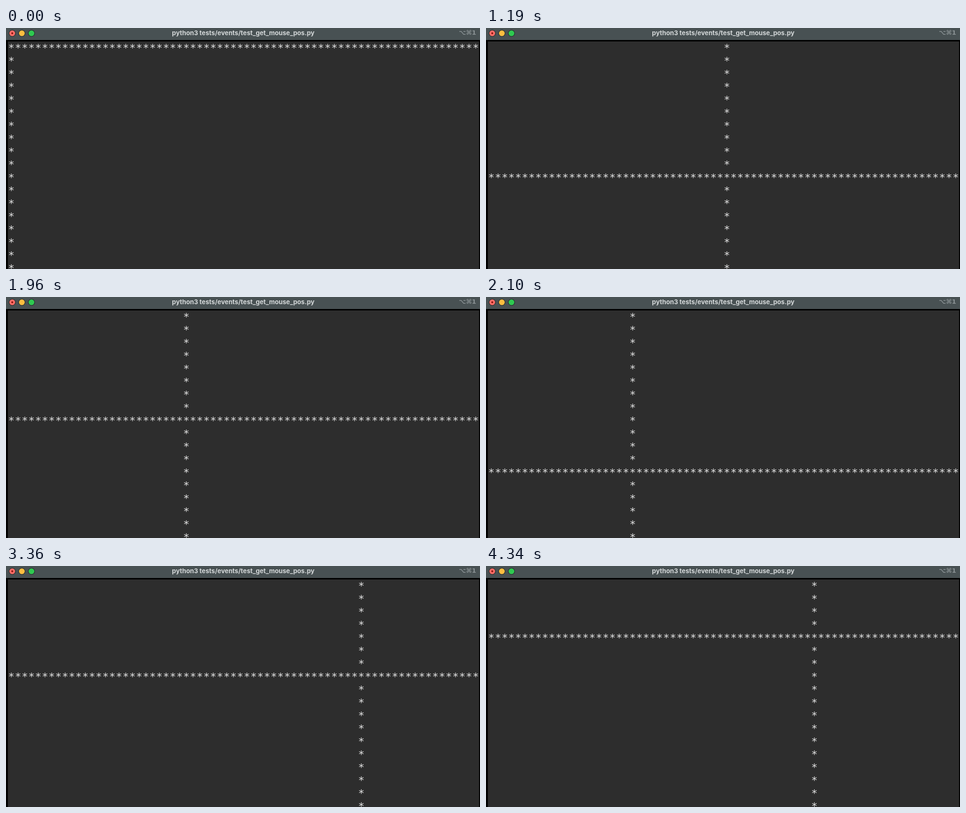
Write an HTML page with a canvas that moves like this. It is 986x502 px and loops after 4410 ms.

```html
<!DOCTYPE html>
<html lang="en">
<head>
<meta charset="utf-8">
<title>Mouse position test</title>
<style>
html, body { margin: 0; width: 100%; height: 100%; overflow: hidden; background: #000; }
canvas { display: block; }
</style>
</head>
<body>
<canvas id="stage" width="986" height="502"></canvas>
<script>
const ctx = document.getElementById('stage').getContext('2d');
const LOOP = 4410, COLS = 70, ROWS = 18;

// Mouse cell over time: [start ms, column, row]
const moves = [
  [0, 0, 0], [350, 35, 10], [1260, 26, 8], [2030, 21, 12],
  [2660, 37, 12], [3220, 52, 7], [4060, 48, 4]
];

function rect(color, x, y, w, h) {
  ctx.fillStyle = color;
  ctx.fillRect(x, y, w, h);
}

function disc(color, x, y, r) {
  ctx.fillStyle = color;
  ctx.beginPath();
  ctx.arc(x, y, r, 0, 2 * Math.PI);
  ctx.fill();
}

// Text centred vertically on y by its visible height
function label(text, x, y, font, color, align) {
  ctx.font = font;
  ctx.fillStyle = color;
  ctx.textAlign = align;
  ctx.fillText(text, x, y);
}

function drawWindow() {
  rect('#000', 0, 0, 986, 502);
  rect('#485153', 0, 0, 986, 25);
  rect('#2d2d2d', 4, 28, 980, 474);
  ['#fc6d66', '#fdbd40', '#2fc951'].forEach((color, i) => {
    disc('#23292a', 13 + 20 * i, 11, 7);
    disc(color, 13 + 20 * i, 11, 6);
  });
  disc('#8c1512', 13, 11, 2);
  label('python3 tests/events/test_get_mouse_pos.py', 493.5, 15,
    '700 13.2px Inter, sans-serif', '#d3d7d8', 'center');
  label('⌥⌘1', 978, 14, '700 13px "DejaVu Sans", sans-serif', '#899193', 'right');
}

function drawCross(col, row) {
  ctx.font = '22px "DejaVu Sans Mono", monospace';
  ctx.fillStyle = '#e2e2e2';
  ctx.textAlign = 'center';
  const box = ctx.measureText('*');
  const shift = (box.actualBoundingBoxAscent - box.actualBoundingBoxDescent) / 2;
  const star = (c, r) => ctx.fillText('*', 11 + 14 * c, 38 + 27 * r + shift);
  for (let c = 0; c < COLS; c++) star(c, row);
  for (let r = 0; r < ROWS; r++) if (r !== row) star(col, r);
}

const start = performance.now();

function frame() {
  const t = (performance.now() - start) % LOOP;
  const [, col, row] = moves.findLast(move => move[0] <= t);
  drawWindow();
  drawCross(col, row);
  requestAnimationFrame(frame);
}
frame();
</script>
</body>
</html>
```
